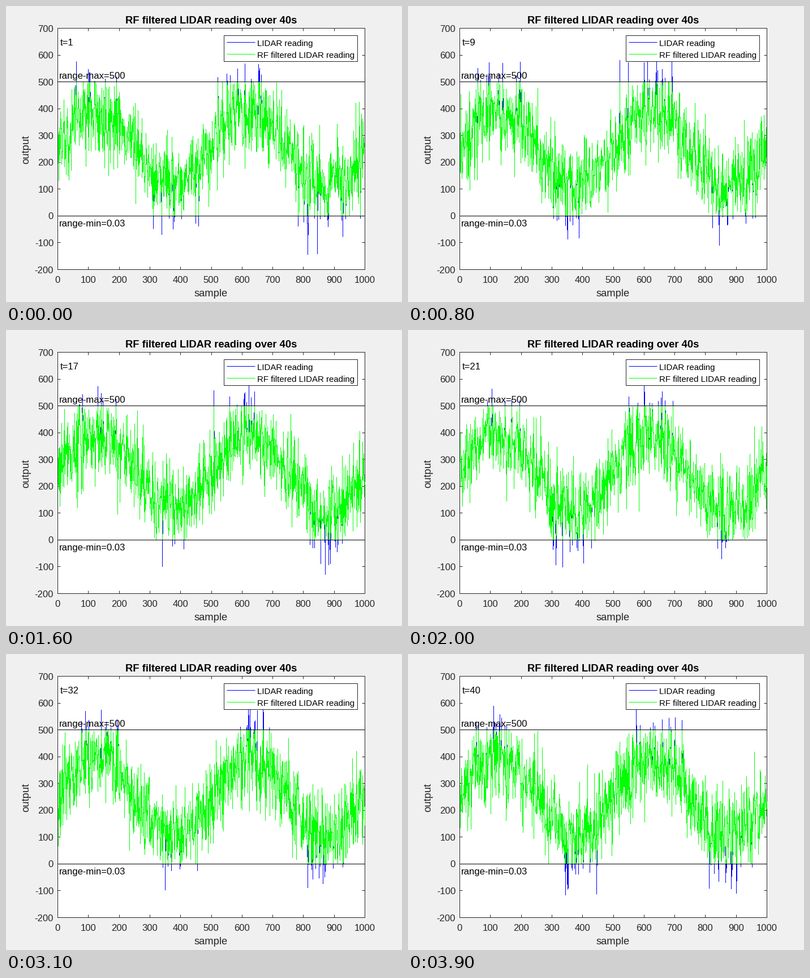
Animation of 700x525 px, one loop 4000 ms. Source, as a matplotlib script:

```python
import numpy as np
import matplotlib.pyplot as plt
from matplotlib.animation import FuncAnimation
from matplotlib.patches import Rectangle

W, H, DPI = 700, 525, 100
PX = 72 / DPI
FRAMES, INTERVAL = 40, 100
RANGE_MIN, RANGE_MAX = 0.03, 500
Y_LOW, Y_HIGH = -200, 700
GREY = (38 / 255,) * 3
BLUE, GREEN = (0, 0, 1), (0, 1, 0)
LEFT, TOP, AX_W, AX_H = 91, 39, 543, 428

plt.rcParams["font.family"] = "Liberation Sans"
plt.rcParams["path.simplify"] = False

samples = np.arange(1, 1001)
wave = 250 + 140 * np.sin(2 * np.pi * samples / 500)

# Samples sit on whole pixel columns, so that each stroke stays one pixel wide
columns = (np.round(samples * AX_W / 1000) + 0.5) * 1000 / AX_W
column_x = np.repeat(columns, 3)


def reading(t):
    """Noisy sensor output at time step t."""
    noise = np.random.default_rng(700 + t).normal(0, 82, samples.size)
    return np.clip(wave + noise, Y_LOW, Y_HIGH)


def column_y(values):
    """For each column: midpoint before, the value, midpoint after."""
    mid = (values[1:] + values[:-1]) / 2
    before = np.r_[values[0], mid]
    after = np.r_[mid, values[-1]]
    return np.column_stack([before, values, after]).ravel()


fig = plt.figure(figsize=(W / DPI, H / DPI), dpi=DPI, facecolor=(240 / 255,) * 3)

ax = fig.add_axes([LEFT / W, 1 - (TOP + AX_H) / H, AX_W / W, AX_H / H])
ax.set(xlim=(0, 1000), ylim=(Y_LOW, Y_HIGH),
       xticks=range(0, 1001, 100), yticks=range(Y_LOW, Y_HIGH + 1, 100))
ax.set_axisbelow(True)
ax.tick_params(direction="in", top=True, right=True, length=5 * PX, width=PX,
               color=GREY, labelbottom=False, labelleft=False)
for spine in ax.spines.values():
    spine.set(linewidth=PX, edgecolor=GREY, zorder=1)


def trace(color):
    return ax.plot(column_x, column_y(wave), color=color, lw=PX, snap=False,
                   clip_on=False, solid_joinstyle="miter",
                   solid_capstyle="butt")[0]


raw_line, filtered_line = trace(BLUE), trace(GREEN)
for limit in (RANGE_MIN, RANGE_MAX):
    ax.axhline(limit, color="black", lw=PX, zorder=2.3)

# Overlay in pixel coordinates, y pointing down
top = fig.add_axes([0, 0, 1, 1])
top.set(xlim=(0, W), ylim=(H, 0))
top.axis("off")


def label(x, y, text, pt=10, color="black", ha="left", **kw):
    """Text with its baseline at pixel y; pt is at 120 dots per inch."""
    return top.text(x, y, text, fontsize=pt * 120 / DPI, color=color, ha=ha,
                    va="baseline", **kw)


for v in range(0, 1001, 100):
    label(LEFT + v * AX_W / 1000, 491, str(v), color=GREY, ha="center")
for v in range(Y_LOW, Y_HIGH + 1, 100):
    y = TOP + (Y_HIGH - v) * AX_H / (Y_HIGH - Y_LOW)
    label(84, y + 6.5, str(v), color=GREY, ha="right")

label(362.5, 31, "RF filtered LIDAR reading over 40s", 11, ha="center", weight="bold")
label(362.5, 515, "sample", 11, GREY, "center")
label(40.5, 254, "output", 11, GREY, "center", rotation=90, rotation_mode="anchor")
label(94, 129, "range-max=500")
label(94, 391, "range-min=0.03")
time_text = label(96, 70, "")

top.add_patch(Rectangle((385, 52), 236, 46, fc="white", ec=GREY, lw=PX))
for y, color, name in ((64, BLUE, "LIDAR reading"),
                       (85, GREEN, "RF filtered LIDAR reading")):
    top.plot([390, 440], [y, y], color=color, lw=PX, solid_capstyle="butt")
    label(443.5, y + 7, name, 9)


def update(i):
    t = i + 1
    raw = reading(t)
    raw_line.set_ydata(column_y(raw))
    filtered_line.set_ydata(column_y(np.clip(raw, RANGE_MIN, RANGE_MAX)))
    time_text.set_text(f"t={t}")
    return raw_line, filtered_line, time_text


anim = FuncAnimation(fig, update, frames=FRAMES, interval=INTERVAL,
                     repeat=True, repeat_delay=0)
plt.show()
```
